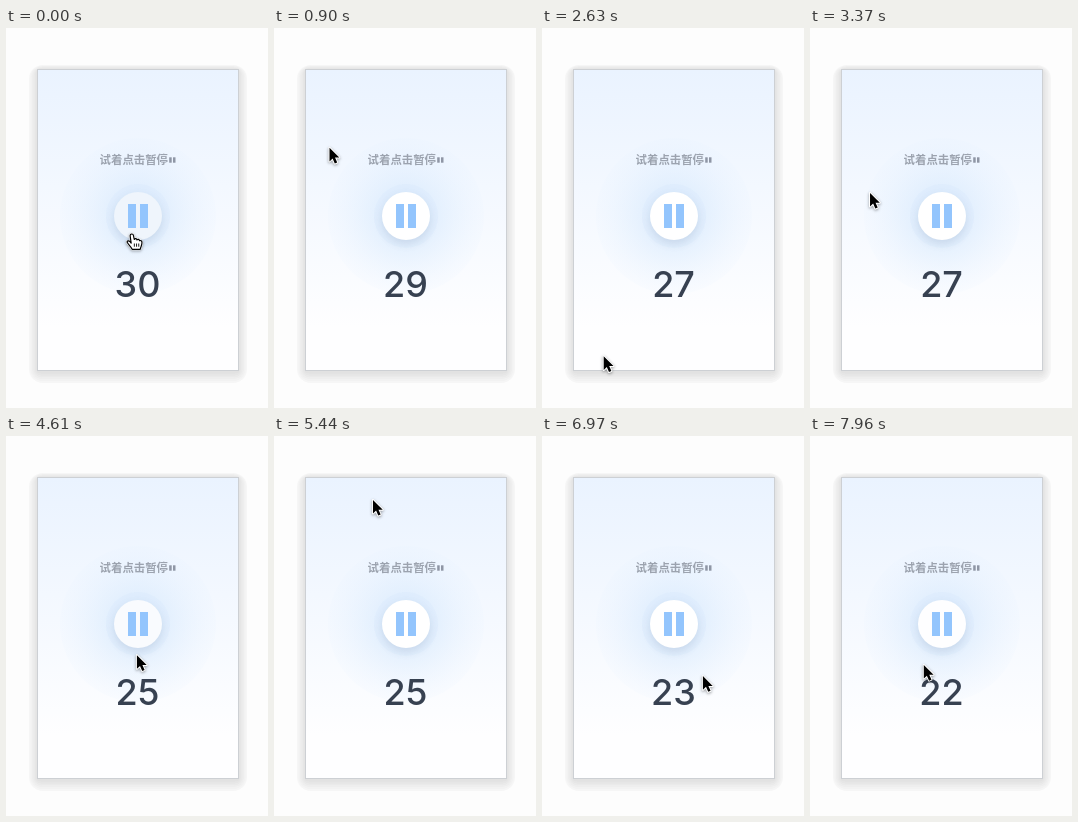
These frames come from a looping animation (262x380 px, 8 s). An HTML page with a canvas:

```html
<!DOCTYPE html>
<html lang="zh">
<head>
<meta charset="utf-8">
<title>Countdown</title>
<style>
html, body { margin: 0; width: 100%; height: 100%; overflow: hidden; background: #fdfdfd; }
canvas { display: block; width: 262px; height: 380px; }
</style>
</head>
<body>
<canvas id="stage"></canvas>
<script>
const W = 262, H = 380, LOOP = 8000;
const BUTTON = { x: 132, y: 188, r: 24 };
const canvas = document.getElementById('stage');
const ctx = canvas.getContext('2d');
const ratio = window.devicePixelRatio || 1;
canvas.width = W * ratio;
canvas.height = H * ratio;

// Turning points of the pointer: time, x, y
const PATH = [
  [0, 126, 206], [430, 22, 165], [840, 51, 111], [1500, 98, 270],
  [1860, 90, 304], [2250, 4, 310], [2800, 84, 318], [3370, 60, 164],
  [3820, 118, 226], [4280, 172, 132], [4610, 131, 218], [4930, 114, 246],
  [5440, 99, 63], [5850, 88, 165], [6200, 118, 268], [6620, 190, 190],
  [6970, 161, 239], [7300, 122, 270], [7680, 158, 204], [8000, 107, 232]
];

const mix = (a, b, k) => a + (b - a) * k;

function slope(i, axis) {
  const a = PATH[Math.max(0, i - 1)], b = PATH[Math.min(PATH.length - 1, i + 1)];
  return (b[axis] - a[axis]) / (b[0] - a[0]);
}

// Cubic Hermite curve through the turning points
function pointerAt(t) {
  t = Math.max(0, t);
  let i = 0;
  while (i < PATH.length - 2 && t >= PATH[i + 1][0]) i++;
  const a = PATH[i], b = PATH[i + 1], d = b[0] - a[0], u = (t - a[0]) / d;
  const at = axis => mix(a[axis], b[axis], u * u * (3 - 2 * u))
    + d * u * (1 - u) * ((1 - u) * slope(i, axis) - u * slope(i + 1, axis));
  return { x: at(1), y: at(2) };
}

function isOver(t) {
  const p = pointerAt(t);
  return Math.hypot(p.x - BUTTON.x, p.y - BUTTON.y) < BUTTON.r;
}

// Hover fades over the last 300 ms
function hoverAt(t) {
  let sum = 0;
  for (let i = 0; i < 15; i++) sum += isOver(t - i * 20);
  return sum / 15;
}

function countAt(t) {
  return 29 - Math.floor((t - 554) / 988);
}

function rect(x, y, w, h, fill, r = 0) {
  ctx.fillStyle = fill;
  ctx.beginPath();
  ctx.roundRect(x, y, w, h, r);
  ctx.fill();
}

function disc(r, fill) {
  ctx.fillStyle = fill;
  ctx.beginPath();
  ctx.arc(BUTTON.x, BUTTON.y, r, 0, Math.PI * 2);
  ctx.fill();
}

function fade(gradient, from, to) {
  gradient.addColorStop(0, from);
  gradient.addColorStop(1, to);
  return gradient;
}

function drawCard() {
  rect(0, 0, W, H, '#fdfdfd');
  for (let i = 0; i < 6; i++) {
    const side = 23 + i * 1.5, top = 37 + i * 0.8, bottom = 355 - i * 1.9;
    const shade = 246 - i * 4;
    rect(side, top, 264 - side * 2, bottom - top, `rgb(${shade},${shade},${shade})`, 14 - i * 2);
  }
  rect(31, 41, 202, 302, '#cdd0d4');
  rect(32, 42, 200, 300, fade(ctx.createLinearGradient(0, 42, 0, 300), '#eaf3ff', '#fefeff'));
  const { x, y, r } = BUTTON;
  disc(78, fade(ctx.createRadialGradient(x, y, r, x, y, 78), 'rgba(205,228,252,.5)', 'rgba(225,239,255,.1)'));
  disc(32, 'rgba(205,226,248,.2)');
}

function drawButton(hover) {
  ctx.save();
  ctx.shadowColor = 'rgba(90,110,140,.16)';
  ctx.shadowBlur = 8 * ratio;
  ctx.shadowOffsetY = 4 * ratio;
  disc(BUTTON.r, `rgb(${mix(255, 239, hover)},${mix(255, 245, hover)},${mix(255, 252, hover)})`);
  ctx.restore();
  rect(122, 176, 8, 24, '#93c5fd');
  rect(134, 176, 8, 24, '#93c5fd');
}

function drawText(count) {
  ctx.textAlign = 'left';
  ctx.fillStyle = '#9ca3af';
  ctx.font = '700 11.4px "Noto Sans CJK SC", "Noto Sans CJK", sans-serif';
  ctx.fillText('试着点击暂停', 93.6, 136);
  rect(163.2, 129.3, 2.5, 5.4, '#8f96a5');
  rect(167, 129.3, 2.5, 5.4, '#8f96a5');
  ctx.textAlign = 'center';
  ctx.fillStyle = '#374151';
  ctx.font = '500 36px Inter, sans-serif';
  ctx.fillText(count, 131.5, 269);
}

const ARROW = new Path2D('M0 1V14.6L3.1 11.7L5.3 16.7L7.7 15.7L5.5 10.8H9.8Z');
const HAND = new Path2D('M-1.6 2.2C-2 -.4 1.4 -.6 1.7 1.6L2.5 5.6'
  + 'C3 4.3 5 4.4 5.2 6C6 5 7.7 5.4 7.8 6.8C8.9 6.2 10.2 7 10.2 8.4'
  + 'C10.4 11.4 9 12.4 8.4 15.4H.4C-.6 12.6 -3.4 10.8 -4.6 8.4'
  + 'C-5 6.8 -2.8 6.5 -1.8 7.8L-.6 9.2Z');
const FINGERS = new Path2D('M2.6 9.6V12.8M4.8 9.6V12.8M7 9.6V12.8');

function outline(path, color, width) {
  ctx.strokeStyle = color;
  ctx.lineWidth = width;
  ctx.stroke(path);
}

function drawPointer(t) {
  const p = pointerAt(t), over = isOver(t), shape = over ? HAND : ARROW;
  ctx.save();
  ctx.translate(p.x, p.y);
  ctx.lineJoin = 'round';
  ctx.save();
  ctx.shadowColor = 'rgba(0,0,0,.4)';
  ctx.shadowBlur = 3 * ratio;
  ctx.shadowOffsetY = ratio;
  outline(shape, '#fff', 2);
  ctx.restore();
  ctx.fillStyle = over ? '#fff' : '#000';
  ctx.fill(shape);
  if (over) {
    outline(HAND, '#000', 1.2);
    outline(FINGERS, '#000', 0.9);
  }
  ctx.restore();
}

function draw(t) {
  ctx.setTransform(ratio, 0, 0, ratio, 0, 0);
  drawCard();
  drawButton(hoverAt(t));
  drawText(countAt(t));
  drawPointer(t);
}

const start = performance.now();
function tick() {
  draw((performance.now() - start) % LOOP);
  requestAnimationFrame(tick);
}
tick();
</script>
</body>
</html>
```
